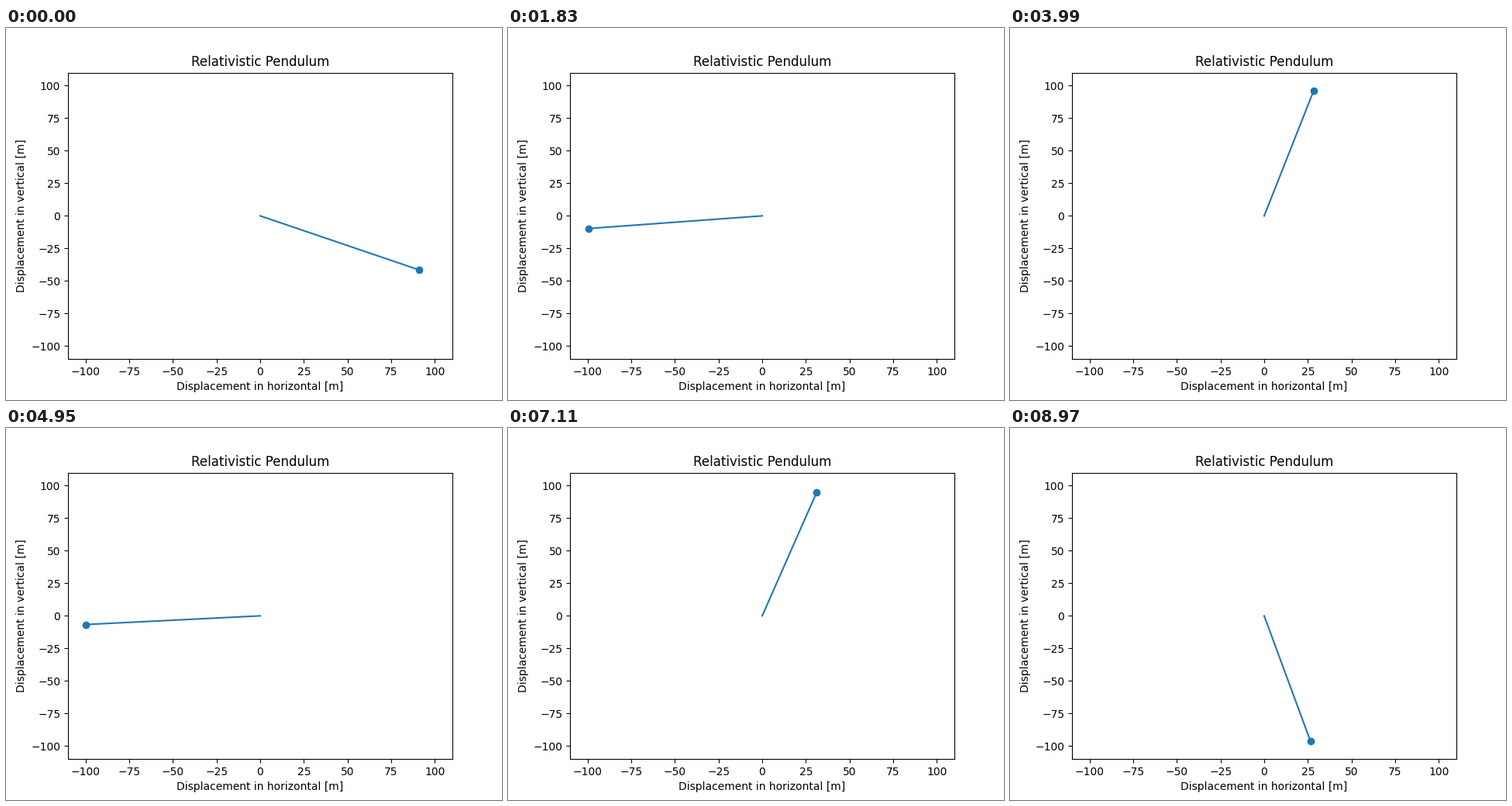
Animation of 640x480 px, one loop 9000 ms. Source, as a matplotlib script:

```python
import numpy as np
import matplotlib.pyplot as plt
from matplotlib.animation import FuncAnimation

FRAMES = 300
INTERVAL = 30                 # ms
LENGTH = 100                  # m
START = np.radians(-24.53)    # measured from the horizontal
STEP = np.radians(3.4445)     # near light speed, so the turn rate is constant

fig, ax = plt.subplots(figsize=(6.4, 4.8), dpi=100)
ax.set(
    xlim=(-110, 110),
    ylim=(-110, 110),
    xticks=range(-100, 101, 25),
    yticks=range(-100, 101, 25),
    title="Relativistic Pendulum",
    xlabel="Displacement in horizontal [m]",
    ylabel="Displacement in vertical [m]",
)
rod, = ax.plot([], [], "o-", color="tab:blue", markevery=[1])


def update(i):
    angle = START + STEP * i
    rod.set_data([0, LENGTH * np.cos(angle)], [0, LENGTH * np.sin(angle)])
    return rod,


anim = FuncAnimation(
    fig, update, frames=FRAMES, init_func=lambda: update(0),
    interval=INTERVAL, repeat=True, repeat_delay=0, blit=False,
)
plt.show()
```
